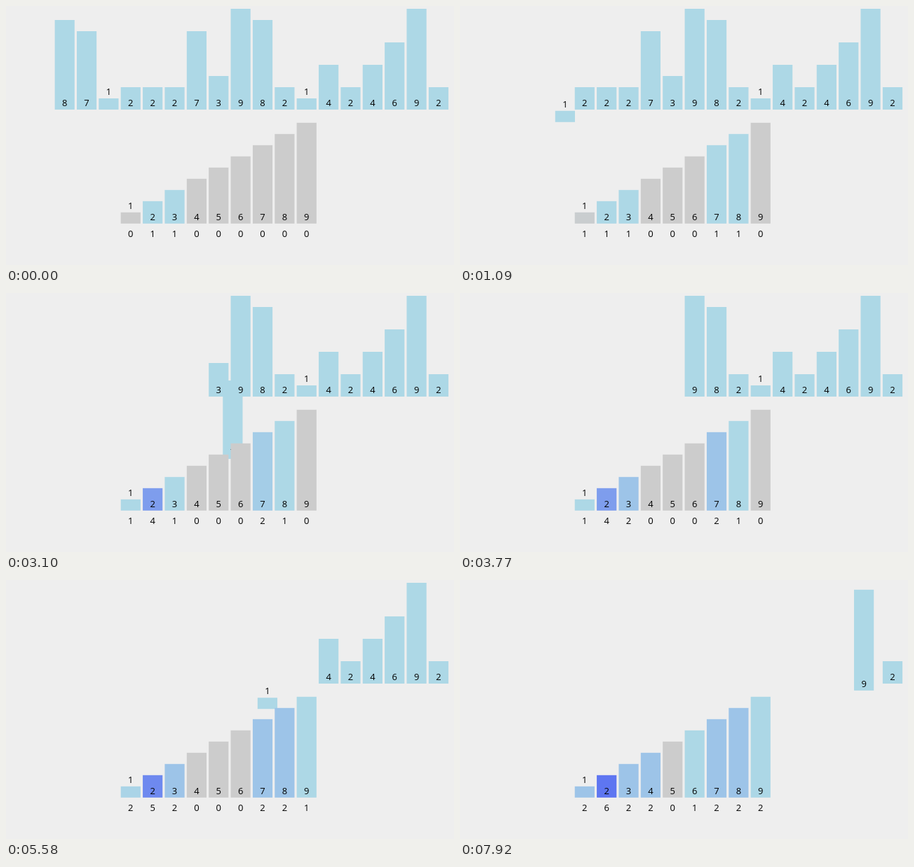
Write an HTML page that moves like this. It is 639 px wide and 370 px high and loops after 8000 ms.

```html
<!DOCTYPE html>
<html lang="en">
<head>
<meta charset="utf-8">
<title>Counting sort</title>
<style>
  html, body { margin: 0; width: 100%; height: 100%; overflow: hidden; background: #eee; }
  svg { display: block; width: 639px; height: 370px; }
  text { font: 13px "Open Sans", "Noto Sans", sans-serif; text-anchor: middle; fill: #000; }
</style>
</head>
<body>
<svg id="stage" viewBox="0 0 639 370"></svg>
<script>
// The picture advances in ticks; moves are timed in ticks too.
const LOOP = 8000, TICK = 134.2;
const FIRST_MOVE = 0.14, MOVE_PERIOD = 3.65, MOVE_LENGTH = 1.86;

const LEFT = 69.6, PITCH = 31.37, WIDTH = 28.2, UNIT = 16;
const QUEUE_BASE = 148, BIN_BASE = 310.8, COUNT_Y = 330, BIN_SLOT = 3;
const GREY = [204, 204, 204], LIGHT = [173, 216, 230], BLUE = [0, 0, 255];

const values = [..."871222739821424692"].map(Number);
const placed = [2, 3];
const initialCounts = Array.from({ length: 9 }, (_, b) => placed.filter(v => v === b + 1).length);

const stage = document.getElementById("stage");

function add(parent, tag, attrs = {}) {
  const node = document.createElementNS("http://www.w3.org/2000/svg", tag);
  for (const key in attrs) node.setAttribute(key, attrs[key]);
  return parent.appendChild(node);
}

function makeBar(slot, value, base) {
  const group = add(stage, "g");
  const x = LEFT + slot * PITCH, height = value * UNIT;
  const rect = add(group, "rect", { x, y: base - height, width: WIDTH, height });
  const labelY = Math.round(base) - (value === 1 ? 21 : 5);
  add(group, "text", { x: x + WIDTH / 2, y: labelY }).textContent = value;
  return { group, rect, x };
}

const mix = (a, b, k) => a.map((v, i) => v + (b[i] - v) * k);
const css = c => `rgb(${c.map(Math.round)})`;
const clamp = t => Math.min(1, Math.max(0, t));
const ease = t => t < 0.5 ? 4 * t ** 3 : 1 - 4 * (1 - t) ** 3;
const countColor = n => n ? mix(LIGHT, BLUE, (n - 1) / 11) : GREY;

const queue = values.map((value, i) => {
  const bar = makeBar(i, value, QUEUE_BASE);
  bar.rect.setAttribute("fill", css(LIGHT));
  return bar;
});

const bins = initialCounts.map((_, b) => {
  const bar = makeBar(b + BIN_SLOT, b + 1, BIN_BASE);
  bar.count = add(bar.group, "text", { x: bar.x + WIDTH / 2, y: COUNT_Y });
  return bar;
});

function render(tick) {
  const counts = initialCounts.slice();
  const colors = counts.map(countColor);

  queue.forEach((bar, i) => {
    const t = clamp((tick - FIRST_MOVE - i * MOVE_PERIOD) / MOVE_LENGTH);
    const k = ease(t), b = values[i] - 1;
    const dx = (bins[b].x - bar.x) * k, dy = (BIN_BASE - QUEUE_BASE) * k;
    bar.group.setAttribute("transform", `translate(${dx} ${dy})`);
    bar.group.setAttribute("visibility", t < 1 ? "visible" : "hidden");
    if (t > 0) {
      counts[b]++;
      colors[b] = mix(colors[b], countColor(counts[b]), k);
    }
  });

  bins.forEach((bin, b) => {
    bin.rect.setAttribute("fill", css(colors[b]));
    bin.count.textContent = counts[b];
  });
}

const origin = performance.now();
function frame() {
  const time = (performance.now() - origin) % LOOP;
  render(Math.floor(time / TICK));
  requestAnimationFrame(frame);
}
frame();
</script>
</body>
</html>
```
